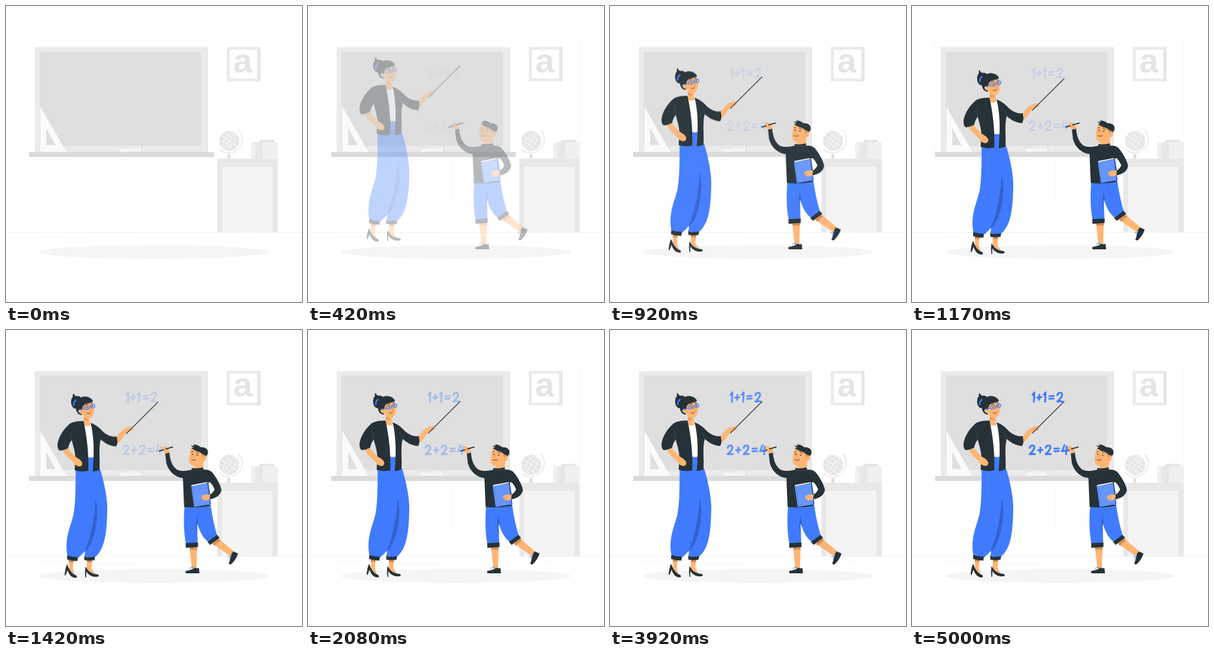
Write an HTML page that moves like this. It is 500 px wide and 500 px high and loops after 5120 ms.

```html
<!DOCTYPE html>
<html lang="en">
<head>
<meta charset="utf-8">
<title>Maths lesson</title>
<style>
  html, body { margin: 0; width: 100%; height: 100%; overflow: hidden; background: #fff; }
  svg { display: block; width: 100%; height: 100%; }
  .ink { fill: #263238; }
  .blue { fill: #407bff; }
  .deep { fill: #3362cc; }
  .skin { fill: #ffb573; }
  .tan { fill: #d58d55; }
  .line { fill: none; stroke-linecap: round; stroke-linejoin: round; }
  .cast { animation: appear 5120ms step-end infinite; }
  .teacher { animation: drop 5120ms linear infinite; }
  .boy { animation: slide 5120ms linear infinite; }
  .chalk { stroke: #407bff; stroke-width: 3.1; animation: write 5120ms cubic-bezier(.33, .1, .6, .72) infinite; }
  @keyframes appear { 0% { visibility: hidden; } 3.31%, 100% { visibility: visible; } }
  @keyframes drop {
    0% { opacity: 0; transform: translateY(-30px); animation-timing-function: cubic-bezier(.32, -.01, .48, 1.38); }
    28.9%, 100% { opacity: 1; transform: none; }
  }
  @keyframes slide {
    0% { opacity: 0; transform: translateX(-30px); animation-timing-function: cubic-bezier(.32, -.01, .48, 1.38); }
    28.9%, 100% { opacity: 1; transform: none; }
  }
  @keyframes write { from { opacity: 0; } to { opacity: 1; } }
</style>
</head>
<body>
<svg viewBox="0 0 500 500">
  <defs>
    <path id="one" d="M0 4.5 L3.2 .5 L2.4 16.5"/>
    <path id="two" d="M.6 4.6 C1.5 -.3 8.3 -1 8.6 3.6 C8.8 7.6 4.5 11.6 .5 15.4 C3.5 14.6 6.5 14.8 9.2 15.2"/>
    <path id="four" d="M4.6 .5 C4 4 2.6 7.5 .5 10.8 C4 10 7.5 9.8 10.6 10 M8.6 2.5 L7.6 16"/>
    <path id="plus" d="M0 4.6 L7.4 4 M3.9 0 L3.5 8.4"/>
    <path id="equals" d="M0 .4 L7.6 0 M0 4.9 L7.6 4.5"/>
  </defs>

  <!-- room -->
  <g fill="none" stroke="#f9f9f9">
    <rect x="39" y="55.5" width="203.5" height="282" rx="4"/>
    <rect x="255" y="55.5" width="203.5" height="282" rx="4"/>
  </g>
  <path d="M0 382.5 H500" stroke="#f1f1f1"/>
  <path d="M49 390.5 H97 M135 395.5 H225 M104 390.5 H113 M400 390.5 H417 M416 398.5 H449" stroke="#f7f7f7"/>
  <ellipse cx="250" cy="415.5" rx="194" ry="11.5" fill="#f5f5f5"/>

  <!-- board -->
  <rect x="48.5" y="69.5" width="292" height="178" fill="#ebebeb"/>
  <rect x="339" y="69.5" width="1.5" height="178" fill="#e0e0e0"/>
  <rect x="57" y="77" width="272.5" height="159.5" fill="#dfdfdf"/>
  <rect x="39" y="246.5" width="312" height="8.5" fill="#dbdbdb"/>
  <path d="M58 170 V246.5 H102 Z M68 206 L83.5 235 H68 Z" fill="#fafafa" fill-rule="evenodd"/>
  <rect x="192" y="235" width="12" height="6" fill="#e6e6e6"/>
  <rect x="204" y="236.5" width="25" height="4.5" fill="#ebebeb"/>
  <rect x="192" y="240.5" width="37" height="6" fill="#f5f5f5"/>
  <path d="M229.5 236 V247 H204" fill="none" stroke="#d6d6d6"/>

  <!-- picture -->
  <rect x="373" y="69" width="56.5" height="58.5" fill="#ebebeb"/>
  <path d="M428.5 69 V127" stroke="#e0e0e0" stroke-width="2"/>
  <rect x="378" y="74" width="46" height="48.5" fill="#fff"/>
  <text x="400" y="112.4" font-family="'Liberation Sans', Arial, sans-serif" font-weight="700" font-size="58" text-anchor="middle" fill="#e5e5e5">a</text>

  <!-- globe, books, cabinet -->
  <circle cx="377" cy="228" r="17" fill="#e6e6e6"/>
  <g fill="none" stroke="#fafafa" transform="rotate(35 377 228)">
    <ellipse cx="377" cy="228" rx="7.5" ry="17"/>
    <path d="M377 211 V245 M360 228 H394 M362.5 219.5 Q377 223 391.5 219.5 M362.5 236.5 Q377 233 391.5 236.5"/>
  </g>
  <path d="M393 209.5 A23 23 0 0 1 360.5 242" fill="none" stroke="#e0e0e0" stroke-width="1.2"/>
  <rect x="374" y="250" width="5" height="8.5" fill="#e0e0e0"/>
  <rect x="414" y="230" width="14" height="28" fill="#f0f0f0"/>
  <rect x="421" y="230" width="7" height="28" fill="#e8e8e8"/>
  <rect x="428" y="226" width="25" height="32" fill="#e6e6e6"/>
  <rect x="434" y="230" width="25" height="28" fill="#f0f0f0"/>
  <rect x="357" y="258" width="102" height="124" fill="#e8e8e8"/>
  <rect x="365" y="271.5" width="85" height="110.5" fill="#f4f4f4"/>

  <g class="cast">
    <g class="teacher">
      <path class="skin" d="M106 386 H114 L113 403 L116 412 L107 407 Z M137 386 H146 L144 402 L150 411 L140 409 L136 402 Z"/>
      <path class="tan" d="M106 386 H114 V392 L106 391 Z M137 386 H146 L145 392 H137 Z"/>
      <path class="ink" d="M103 395 C106 399 107 409 119 414 Q121 418 118 418 C112 418 107 414 104 405 L100.5 414 L99 413 Q100 402 103 395 Z"/>
      <path class="ink" d="M134 399 C138 403 140 411 155 412 Q159 415 154 416 C146 417 139 413 135.8 407 L135.5 417 H134 Q133 407 134 399 Z"/>
      <path class="blue" d="M137 211 H148 V232 L159 234 C167 260 172 288 171 306 C170 343 167 370 149 384 L132 382 Q134 377 133 373 Q128 379 122 384 L104 382 C98 352 108 335 114 311 C118 288 117.5 262 117.5 234 H138 Z"/>
      <path class="deep" d="M151.5 282 C150 317 143 349 133 373 C146 368 156 325 154 299 Z"/>
      <path class="ink" d="M103.5 380 Q113 383 121.5 383 L120.5 389.5 Q111 389.5 103 386.5 Z M132 382 Q142 384 150.5 382 L149.5 388 Q140 389.5 132.5 388 Z"/>

      <path class="skin" d="M131 142 L141 142 L142 161 L132 162 Z"/>
      <path class="tan" d="M132 147 L140 150 Q135 154 131 152 Z" opacity=".6"/>
      <path d="M131 159 Q138 164 144 159 L148 172 L148 214 Q142 216 137 213 Z" fill="#fff"/>
      <path class="ink" d="M131 153 C121 153 111 154 106 159 C95 169 88 182 87 193 Q87 201 91 203 Q99 202 105 199 Q106 192 111 185 C114 197 118 208 117 218 L116 236 Q128 240 139 237 C140 209 137 181 131 153 Z"/>
      <path class="ink" d="M143 156 C151 159 156 163 160 167 C168 176 178 181 188 179 Q190 189 186 196 C174 195 167 190 160 184 C156 198 159 216 158 235 Q152 239 146.5 238 C149 208 149 181 143 156 Z"/>
      <path class="skin" d="M96 203 L105 199.5 C109 206 116 213 124 217.5 Q131 223 128 228 Q124 232 117 227 C112 219 101 213 96 203 Z"/>
      <path class="line" d="M111 185 Q111 177 108 171 M160 183 Q158 175 154 172" stroke="#46545a" stroke-width=".7"/>
      <path class="skin" d="M187 180 C192 173 196 167 204 164 L213 162 L211 165 L215.5 166.5 Q213 170 205 171.5 C199 176 196 185 189 190 Z"/>
      <path class="line" d="M203.5 174 L257 120.8" stroke="#263238" stroke-width="1.2"/>

      <path class="skin" d="M126 125 C130 117 144 118 147 124 C150 133 149 142 144 147 C138 151 132 148 130 142 Q124 141 122 136 Q123 132 127 134 Z"/>
      <path class="ink" d="M110 121 Q110 114 113 112 Q112 108 114.5 106 Q115 110 119 111 Q124 110 126 113 C135 109 145 113 147 120 C141 124 134 122 130 128 L128 135 Q123 132 122 136 Q123 140 128 141 L128 143 Q119 142 118 132 C113 132 110 127 110 121 Z"/>
      <path class="line" d="M114.5 126 Q114 121 118 117.5" stroke="#407bff" stroke-width="2.5"/>
      <g class="line" stroke="#407bff" stroke-width="1.3">
        <ellipse cx="136.5" cy="130.5" rx="4.2" ry="2.9" transform="rotate(-15 136.5 130.5)"/>
        <ellipse cx="146.5" cy="127.8" rx="3.8" ry="2.9" transform="rotate(-15 146.5 127.8)"/>
        <path d="M132 132 L124 134 M140.5 129.5 L143 128.5"/>
      </g>
      <circle class="ink" cx="137" cy="130.5" r="1"/>
      <circle class="ink" cx="146" cy="128" r="1"/>
      <path class="line" d="M134 126 Q136 124 139 125 M143 123 L146 123 M137 140 Q140 142 143 139" stroke="#263238" stroke-width=".9"/>
      <path class="line" d="M142 131 L144 136 L142 136" stroke="#d58d55" stroke-width=".9"/>
    </g>

    <g class="boy">
      <path class="skin" d="M309 365 H322 L321 403 H313 Z M348 361 L358 352 L384 374 L378 382 Z"/>
      <path class="tan" d="M309 365 H322 V371 H309.5 Z M348 361 L358 352 L361.5 355 L351 364 Z"/>
      <path class="ink" d="M303 407 Q314 405 318 401.5 Q322 403 325 402 L326 411 H303 Q302 409 303 407 Z"/>
      <path class="ink" d="M376 393 Q379 384 380 378 L383 374 L391 377.5 C389 385 384 392 379 396 Q374 396 376 393 Z"/>
      <path class="line" d="M309 403 L314 400 L316 403 M374 383 L379 382 L377 387" stroke="#407bff" stroke-width="1"/>
      <path class="blue" d="M301 296 H345 C348 318 352 334 356 347 L342 359 C331 351 326 339 322 326 L323 361 H303 C299 339 299 317 301 296 Z"/>
      <path class="deep" d="M322 313 L324.5 332 L322 327 L322 348 Q318 331 322 313 Z"/>
      <path class="ink" d="M302.5 360 L323.5 359 V366.5 L303 368 Z M339.5 358 L355.5 346 L360 351 L344 363 Z"/>

      <path class="skin" d="M317 222 H333 L332 238 H317 Z"/>
      <path class="ink" fill-rule="evenodd" d="M268 207 L275 205 C276 219 279 229 288 236 Q297 240 313 236 V233 Q322 235 332 232 L333 236 Q340 235 346 239 C353 246 362 262 363 270 C362 280 351 285 343 286 L344 297 Q322 301 300 299 L298 250 C285 249 274 239 270 225 Z M341 258 L344 278 Q350 274 351.5 269 Q348 261 343.5 257 Z"/>
      <path class="line" d="M314 236 Q323 239 332 236" stroke="#46545a" stroke-width=".7"/>
      <path d="M313 264 L312 262 L338 257 L341 258 Z" fill="#fff"/>
      <path class="deep" d="M338 258 L340.5 258 L345.5 295 L341 296 Z"/>
      <path d="M312 264 L339 259 L343.5 294.5 L317 299 Z" fill="#6695ff"/>
      <path class="line" d="M314.5 265 L319 297" stroke="#407bff" stroke-width=".5"/>
      <path class="skin" d="M344 278 Q338 277 333 279 L329 281 L331 286 Q337 290 343 286 Z"/>
      <path class="line" d="M331 282 H336 M332 285 H336" stroke="#d58d55" stroke-width=".6"/>
      <path class="skin" d="M268 209 L263 203 Q262 198 266 196 Q271 197 275 203 L276 207 Z"/>
      <path class="line" d="M258 204.5 L280.5 197.6" stroke="#263238" stroke-width="1.9"/>
      <path class="line" d="M265 200 L270 204" stroke="#ffb573" stroke-width="3"/>

      <path class="skin" d="M312 200 Q324 197 335 208 C340 213 337 221 333 222 C331 230 325 232 318 230.5 C309 229 307 221 309 213 Z"/>
      <path class="tan" d="M328 206 L340 209 Q337 214 336 219 L331 221 Q332 213 328 206 Z"/>
      <path class="skin" d="M332 214 Q337 211 337 215 Q336 220 331 221 Z"/>
      <path class="ink" d="M311 195 L317 196 L316 193 Q324 194 328 198 C337 197 342 203 340 209 L338 212.5 Q331 210 326 206 C321 205 315 202 312 199 L316 199 Z"/>
      <circle class="ink" cx="314" cy="210" r="1.1"/>
      <circle class="ink" cx="322" cy="211.5" r="1.1"/>
      <path class="line" d="M312 206 L315 205.5 M321 206.5 L325 208.5 M312.5 219 Q316 221.5 320 219" stroke="#263238" stroke-width=".9"/>
      <path class="line" d="M317 211 L314.5 215 L317 216" stroke="#d58d55" stroke-width=".8"/>
    </g>
  </g>

  <g class="chalk line" role="img" aria-label="1+1=2, 2+2=4">
    <use href="#one" x="203.5" y="105"/>
    <use href="#plus" x="211.3" y="109.5"/>
    <use href="#one" x="222.5" y="105"/>
    <use href="#equals" x="231.8" y="111.3"/>
    <use href="#two" x="245" y="105.5"/>
    <use href="#two" x="198.2" y="194.5"/>
    <use href="#plus" x="213" y="198.5"/>
    <use href="#two" x="225.2" y="194.5"/>
    <use href="#equals" x="240.6" y="200"/>
    <use href="#four" x="252.7" y="194"/>
  </g>
</svg>
</body>
</html>
```
